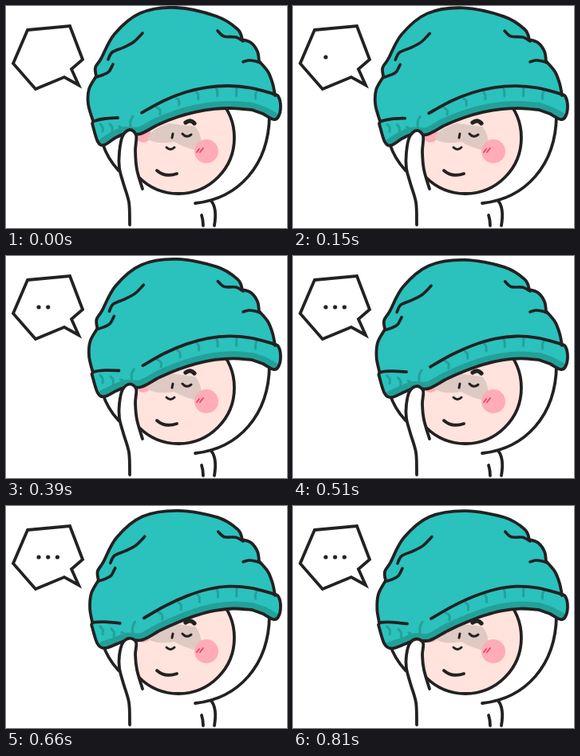
An HTML page with a canvas for the animation above (2.04 s loop, 352 by 278 pixels).

```html
<!DOCTYPE html>
<html lang="en">
<head>
<meta charset="utf-8">
<title>Sleepy hat</title>
<style>
  html, body { margin: 0; width: 100%; height: 100%; overflow: hidden; background: #fff; }
  canvas { display: block; width: 352px; height: 278px; }
</style>
</head>
<body>
<canvas id="stage" width="352" height="278"></canvas>
<script>
const ctx = document.getElementById('stage').getContext('2d');
const LOOP = 2040, MOVE = 810, STEP = 30;
const INK = '#232122', TEAL = '#2bc1bd', SHADE = '#22a199', BLUSH = '#ffabb8';
const DOT_TIMES = [150, 270, 420];

const clamp = v => Math.max(0, Math.min(1, v));
const smooth = v => { v = clamp(v); return v * v * (3 - 2 * v); };
const pts = text => text.split(' ').map(s => s.split(',').map(Number));

// Samples y = f(x) from x = a to x = b
const sample = (f, a, b, n = 6) =>
  Array.from({ length: n + 1 }, (_, i) => a + (b - a) * i / n).map(x => [x, f(x)]);

// Smooth curve through points, continuing the current path
function spline(path, list, join) {
  if (join) path.lineTo(...list[0]); else path.moveTo(...list[0]);
  for (let i = 0; i < list.length - 1; i++) {
    const a = list[i - 1] || list[i], b = list[i], c = list[i + 1], d = list[i + 2] || c;
    path.bezierCurveTo(
      b[0] + (c[0] - a[0]) / 6, b[1] + (c[1] - a[1]) / 6,
      c[0] - (d[0] - b[0]) / 6, c[1] - (d[1] - b[1]) / 6, c[0], c[1]);
  }
}

function curves(...parts) {
  const path = new Path2D();
  parts.forEach((part, i) => spline(path, part, i > 0));
  return path;
}

function stroke(path, width = 3.8, color = INK) {
  ctx.lineWidth = width;
  ctx.strokeStyle = color;
  ctx.stroke(typeof path === 'string' ? new Path2D(path) : path);
}

function fill(path, color) {
  ctx.fillStyle = color;
  ctx.fill(typeof path === 'string' ? new Path2D(path) : path);
}

function circle(x, y, r) {
  const path = new Path2D();
  path.arc(x, y, r, 0, Math.PI * 2);
  return path;
}

// Sag of the knitted hat: the left side sinks, the right side and the far left tip stay
function sag([x, y], p) {
  const left = smooth((302 - x) / 110);
  const pinned = smooth((y - 115) / 30) * smooth((140 - x) / 30);
  const k = p * left * (1 - pinned);
  return [x + 3 * k - p * pinned, y + (4.6 + 3.6 * clamp((y - 60) / 100)) * k + p * pinned * 1.8];
}

const brimY = x => 100 + (x - 277) ** 2 / 340;
const hemY = x => 128 + (x - 280) ** 2 / 390;

const body = [
  '109,144 103,123 104,104 113,88',
  '113,88 112,77 119,66 136,35 168,9 213,2 264,13 290,29 296,42',
  '296,42 307,46 315,57 317,69',
  '317,69 328,82 334,97 337,112'
].map(pts);
const folds = [
  '128,67 133,58 147,52 160,45 171,34',
  '134,73 129,82 122,86 113,89',
  '265,31 273,38 288,39 297,44',
  '297,70 304,68 312,69 318,71'
].map(pts);
const brim = sample(brimY, 170, 334);
const tip = pts('334,110 341,113 344,126 341,139 335,142 322,135');
const hem = [...sample(hemY, 308, 168), ...pts('150,160 137,165 123,174 115,170 108,147')];
const cuff = pts('108,147 111,144 124,141 140,140');
const arm = pts('155,274 154,246 147,222 142,203 142,183 146,163 155,155 163,162 162,182 164,205 171,229');

// A knit rib leans towards the middle of the brim
const rib = (x, y, lean, len = 9) => [[x, y], [x + lean, y + len * 0.4], [x + lean, y + len]];
const ribs = [118, 130].map(x => rib(x, 148, 3));
ribs.push(rib(142, 151, 5, 7), rib(159, 138, -3, 15));
for (let x = 188; x < 320; x += 25.2) ribs.push(rib(x, brimY(x) + 3, (285 - x) * 0.05));

function drawBubble(t) {
  ctx.lineJoin = 'miter';
  stroke('M27 30L80 25L96 67L82 79L91 99L73 89L37 104L9 72Z');
  ctx.lineJoin = 'round';
  DOT_TIMES.forEach((at, i) => { if (t >= at) fill(circle(41 + 11.7 * i, 64, 2.6), INK); });
}

function drawHead() {
  stroke('M121 172Q127 191 141 206');
  stroke('M330 138C329 199 292 241 237 247');
  stroke('M257 244C263 251 263 263 261 275');
  stroke('M245 262Q247 268 247 275');

  const face = circle(216, 165, 70);
  fill(face, '#ffe3dc');
  fill(circle(172, 161, 10), BLUSH);
  fill('M177 166Q182 153 205 147L237 151Q247 162 244 182Q224 178 211 170Q187 174 177 166Z', '#dfc9c3');
  fill(circle(251, 182, 15), BLUSH);
  stroke('M239 183L242 179M243 183L247 178', 1.7, '#e8405f');
  stroke(face);

  stroke('M225 146Q231 141 236 147', 5.2);
  stroke('M221 160Q226 166 232 161M209 160L208 165M201 177Q206 182 211 177', 3);
  stroke('M189 206Q199 215 214 210');
}

function drawHat(p) {
  const bend = list => list.map(q => sag(q, p));
  const [tipNow, hemNow, cuffNow, brimNow] = [tip, hem, cuff, brim].map(bend);
  const bodyNow = body.map(bend);

  fill(curves(...bodyNow, tipNow, hemNow), TEAL);
  ctx.save();
  ctx.clip(curves(cuffNow, brimNow, tipNow, hemNow));
  stroke(curves(tipNow.slice(4), hemNow.slice(0, -2)), 18, SHADE);
  ctx.restore();
  ribs.forEach(r => stroke(curves(bend(r)), 3, SHADE));
  stroke(curves(...bodyNow));
  folds.forEach(f => stroke(curves(bend(f)), 3.6));
  stroke(curves(brimNow, tipNow, hemNow, cuffNow));
}

// The fingertips follow the hat down, the forearm stays
function drawArm(p) {
  const path = curves(arm.map(([x, y]) => [x, y + 11.5 * p * clamp((200 - y) / 45)]));
  fill(path, '#fff');
  stroke(path);
}

function draw(now) {
  const t = Math.floor((now % LOOP) / STEP) * STEP;
  const p = (1 - Math.cos(Math.PI * clamp(t / MOVE))) / 2;
  ctx.fillStyle = '#fff';
  ctx.fillRect(0, 0, 352, 278);
  ctx.lineCap = ctx.lineJoin = 'round';
  drawBubble(t);
  drawHead();
  drawHat(p);
  drawArm(p);
}

const start = performance.now();
function tick() {
  draw(performance.now() - start);
  requestAnimationFrame(tick);
}
tick();
</script>
</body>
</html>
```
